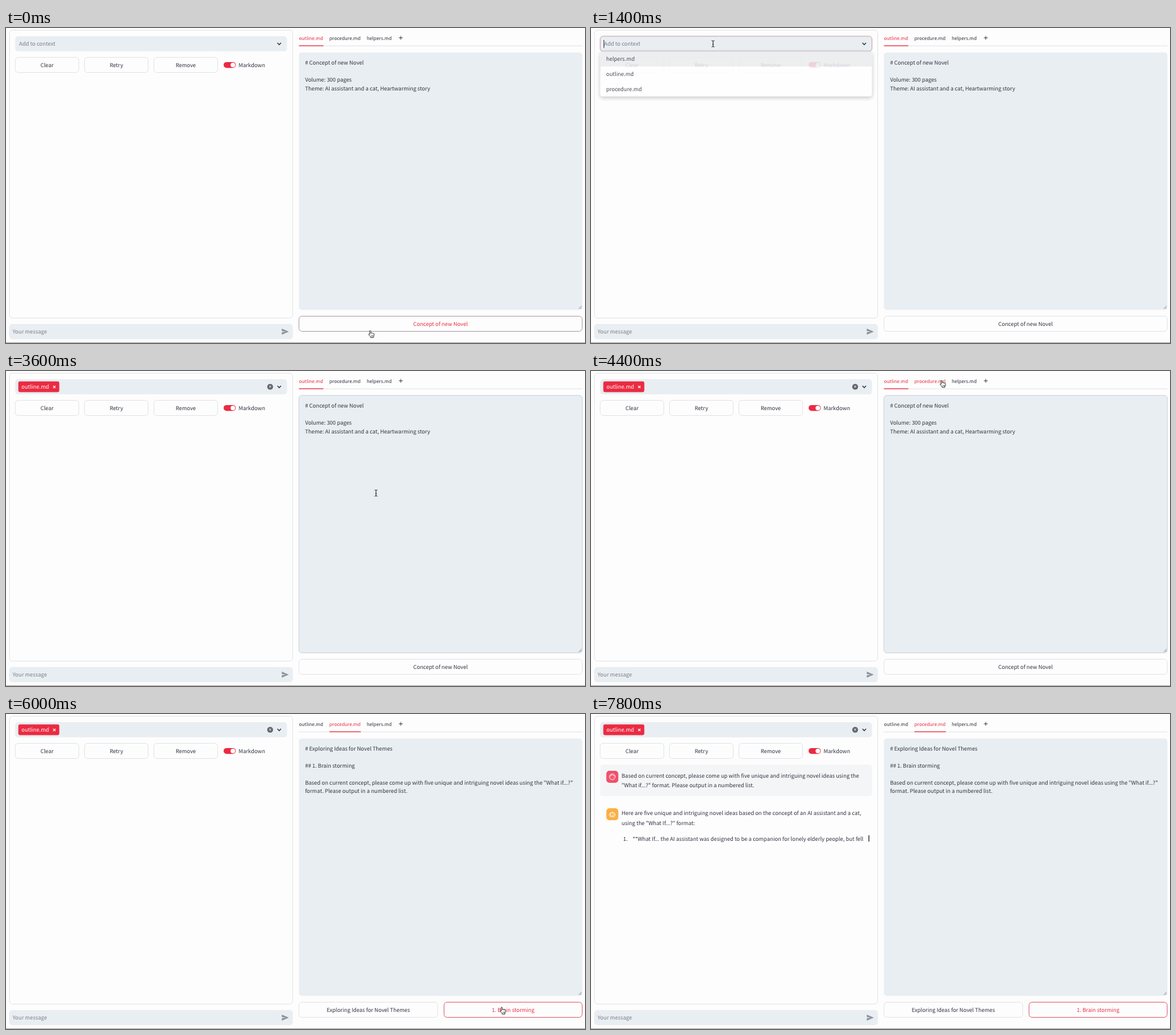
An HTML page that plays this animation: 918 by 499 pixels, repeating every 8000 ms.

```html
<!DOCTYPE html>
<html lang="en">
<head>
<meta charset="utf-8">
<title>Novel assistant</title>
<style>
  html, body { margin: 0; width: 100%; height: 100%; overflow: hidden; background: #fdfdfd; }
  svg { display: block; width: 918px; height: 499px; }
  text {
    font: 8.54px "Noto Sans CJK JP", "Noto Sans CJK SC", "Noto Sans CJK", "Noto Sans", sans-serif;
    text-rendering: geometricPrecision;
    white-space: pre;
  }
  .tab { font-size: 7.47px; }
</style>
</head>
<body>
<svg viewBox="0 0 918 499"></svg>
<script>
const LOOP = 8000, STEP = 200;
const RED = '#ea2b42', INK = '#31333f', FIELD = '#e9eef2', LINE = '#e3e4e7', GRAY = '#7b7e87';
const svg = document.querySelector('svg');

const PROMPT = ['Based on current concept, please come up with five unique and intriguing novel ideas using the',
  '"What if...?" format. Please output in a numbered list.'];
const NOTES = {
  outline: ['# Concept of new Novel', '', 'Volume: 300 pages',
    'Theme: AI assistant and a cat, Heartwarming story'],
  procedure: ['# Exploring Ideas for Novel Themes', '', '## 1. Brain storming', '',
    PROMPT[0] + ' "What if...?"', 'format. Please output in a numbered list.']
};
const REPLY = [
  { x: 48.5, y: 160.3, s: 'Here are five unique and intriguing novel ideas based on the concept of an AI assistant and a cat,' },
  { x: 48.5, y: 175.5, s: 'using the "What If...?" format:' },
  { x: 66, y: 200.7, s: '**What If... the AI assistant was designed to be a companion for lonely elderly people, but fell' }
];
const REPLY_LENGTH = REPLY.reduce((n, line) => n + line.s.length, 0);
const PAUSE_LENGTH = REPLY[0].s.length + 'using the "'.length;

// Pointer path: time, x, y, shape from that time on
const POINTER = [
  [0, 579.5, 485, 'hand'], [200, 579.5, 485, 'hand'], [400, 540, 440, 'beam'], [600, 450, 340, 'arrow'],
  [800, 300, 170, 'arrow'], [1000, 205, 58, 'hand'], [1200, 193.5, 25, 'beam'], [1600, 193.5, 25, 'hand'],
  [2000, 107, 84, 'hand'], [2800, 107, 84.5, 'hand'], [3000, 300, 150, 'arrow'], [3200, 560, 200, 'beam'],
  [3800, 600, 190, 'beam'], [4200, 560, 32, 'arrow'], [4400, 558, 20.5, 'hand'], [4800, 558, 20.5, 'hand'],
  [5000, 600, 90, 'beam'], [5400, 765, 410, 'beam'], [5600, 788, 470, 'hand'], [6400, 788, 470, 'hand'],
  [6600, 800, 484, 'arrow'], [6800, 0, 0, 'none']
];
const SHAPES = {
  hand: `<path d="M-3-4.7c0-1.3 1.8-1.3 1.9 0L-.8-1.5c.4-.8 1.5-.6 1.6.1.5-.6 1.5-.4 1.6.3.7-.5 1.8-.1 1.7.9C4.1 2.3 3.7 3.4 3 4.2V5.4H-1.4V4.3C-2.6 3.2-3.4 1.9-4.3.8-5-.2-3.7-.8-2.6.4Z"
    fill="#fff" stroke="#222" stroke-width=".9" stroke-linejoin="round"/>
    <path d="M-.2 1.7V4M1.2 1.7V4M2.5 1.7V4" stroke="#222" stroke-width=".6"/>`,
  beam: `<path d="M-2.2-5Q0-5 0-3.8Q0-5 2.2-5M0-4V4M-2.2 5Q0 5 0 3.8Q0 5 2.2 5M-1 .8H1"
    fill="none" stroke="#222" stroke-width="1"/>`,
  arrow: `<path d="M-3-5V4.5L-.8 2.5.7 5.6 2.2 4.9.8 1.9H3.7Z" fill="#222" stroke="#fff" stroke-width=".8"/>`
};

const lerp = (a, b, k) => a + (b - a) * k;
const clamp = v => Math.max(0, Math.min(1, v));
const text = (x, y, s, fill = INK, extra = '') => `<text x="${x}" y="${y}" fill="${fill}" ${extra}>${s}</text>`;
const box = (x, y, x2, y2, fill, stroke = 'none', r = 4.8) =>
  `<rect x="${x}" y="${y}" width="${x2 - x}" height="${y2 - y}" rx="${r}" fill="${fill}" stroke="${stroke}"/>`;
const stroke = (d, color, width = 1) => `<path d="${d}" fill="none" stroke="${color}" stroke-width="${width}"/>`;
const cross = (x, y, r, color) => stroke(`M${x - r} ${y - r}L${x + r} ${y + r}M${x + r} ${y - r}L${x - r} ${y + r}`, color, 1.1);
const button = (x, y, x2, label, hot = false, edge = '#df6070') =>
  box(x, y, x2, y + 24, '#fdfdfd', hot ? edge : LINE) +
  text((x + x2) / 2, y + 15.1, label, hot ? RED : INK, 'text-anchor="middle"');

function selectBox(t) {
  const open = t >= 1400 && t < 3400, chosen = t >= 2400;
  let out = box(14.5, 13, 445.5, 37, FIELD, open ? (chosen ? '#a9b3bd' : '#c9a0aa') : 'none');
  if (chosen) {
    out += box(19.5, 16.5, 84.5, 33.5, RED, 'none', 2.4) + text(24.5, 28.3, 'outline.md', '#fff') +
      cross(76.6, 25.2, 1.9, '#fff') + '<circle cx="418.8" cy="25" r="4.6" fill="#5d6068"/>' +
      cross(418.8, 25, 1.6, FIELD);
  } else {
    out += text(20.8, 28.3, 'Add to context', GRAY);
    if (open) out += stroke('M20.5 19V31.5', INK);
  }
  return out + stroke('M430.4 23.6L433.2 26.4L436 23.6', INK, 1.4);
}

function controls(t) {
  return button(14.5, 46.5, 115.5, 'Clear') + button(124.5, 46.5, 225.5, 'Retry', t === 1000) +
    button(234.5, 46.5, 335.5, 'Remove') + box(345, 54, 364.3, 63.2, RED, 'none', 4.6) +
    '<circle cx="359.7" cy="58.6" r="3.7" fill="#fff"/>' + text(368.8, 61.8, 'Markdown');
}

function dropdown(t) {
  if (t < 1400 || t >= 3400) return '';
  const items = t < 2400 ? ['helpers.md', 'outline.md', 'procedure.md'] : ['helpers.md', 'procedure.md'];
  const active = t < 1800 ? 0 : t < 3000 ? 1 : -1;
  const bottom = 37 + items.length * 24 - .5;
  const rows = items.map((name, i) =>
    (i === active ? box(14.5, 37 + i * 24, 445.5, 61 + i * 24 - (i === items.length - 1 ? .5 : 0), '#ebecef', 'none', 2) : '') +
    text(24, 52 + i * 24, name)).join('');
  return `<g opacity="${t === 1400 ? .87 : 1}"><g style="filter:drop-shadow(0 2px 3px #0004)">` +
    box(14.5, 37, 445.5, bottom, '#fff', 'none', 4) + `</g>${rows}</g>`;
}

function avatar(y, color, icon) {
  return box(24.3, y, 43.3, y + 19, color) +
    `<g transform="translate(33.8 ${y + 9.5})" fill="none" stroke="#fff" stroke-width=".9">${icon}</g>`;
}

function chat(t) {
  let out = '';
  if (t >= 6400) {
    out += box(14.5, 80, 445.5, 130, '#f4f5f7') +
      avatar(90, '#f0506a', '<circle r="4.6"/><path d="M-4.4-1Q-1.5-1-.6-3.8Q1-1.2 4.4-1.3M-1.8 1.2V2M1.8 1.2V2"/>') +
      PROMPT.map((s, i) => text(48.5, 100.8 + i * 15.2, s)).join('');
  }
  if (t < 6600) return out;
  out += avatar(149.3, '#fbb046', '<path d="M-3.2-2.2H3.2V4H-3.2ZM0-2.2V-4.3M-4.8-.2V2M4.8-.2V2M-1.5-.2V.8M1.5-.2V.8M-1.5 2.4H1.5"/>');
  let left = Math.round(t < 7000 ? PAUSE_LENGTH * (t - 6400) / 600
    : lerp(PAUSE_LENGTH, REPLY_LENGTH, clamp((t - 7000) / 800)));
  for (const [i, line] of REPLY.entries()) {
    if (left <= 0) break;
    if (i === 2) out += text(51, line.y, '1.');
    out += text(line.x, line.y, line.s.slice(0, left), INK, 'class="reply"');
    left -= line.s.length;
  }
  return out + '<rect class="caret" width="1.4" height="10" fill="#31333f"/>';
}

function editor(t) {
  const procedure = t >= 4600, slide = clamp((t - 4400) / 400);
  const tab = (x, name, on) => text(x, 18.9, name, on ? RED : INK, 'class="tab"');
  const lines = t >= 4800 ? NOTES.procedure : NOTES.outline;
  const focused = t >= 3400 && t < 4600;
  let out = tab(464.4, 'outline.md', !procedure) + tab(512.7, 'procedure.md', t >= 4400) + tab(572, 'helpers.md') +
    stroke('M622.9 15.6H628.9M625.9 12.6V18.6', INK, .9) + stroke('M464.5 28.3H914', LINE) +
    stroke(`M${lerp(464.4, 512.7, slide)} 28.2H${lerp(503.2, 562.6, slide)}`, RED, 1.2) +
    box(464.3, 38.7, 913.8, 446.5, FIELD, focused ? '#cbd2d8' : 'none') +
    stroke('M908 445L912.7 440.3M910.7 445L912.7 443', '#777', .8) +
    lines.map((s, i) => text(474.2, 58.3 + i * 13.4, s)).join('');
  if (t < 4800) out += button(464.5, 456.5, 913.5, 'Concept of new Novel', t < 400, '#aaa0a4');
  else if (t < 5000) out += button(464.5, 456.5, 913.5, 'Exploring Ideas for Novel Themes');
  else out += button(464.5, 456.5, 684.5, 'Exploring Ideas for Novel Themes') +
    button(694.5, 456.5, 913.5, '1. Brain storming', t >= 5600);
  return out;
}

function pointer(t) {
  const i = POINTER.findLastIndex(key => key[0] <= t);
  const [t0, x0, y0, shape] = POINTER[i];
  if (shape === 'none') return '';
  const [t1, x1, y1] = POINTER[i + 1], k = (t - t0) / (t1 - t0);
  return `<g transform="translate(${lerp(x0, x1, k)} ${lerp(y0, y1, k)})">${SHAPES[shape]}</g>`;
}

function render(t) {
  svg.innerHTML = box(5.5, 3.5, 454.5, 459.5, '#fdfdfd', LINE) + controls(t) + selectBox(t) + chat(t) + dropdown(t) +
    box(5, 469, 454.8, 493, FIELD) + text(10.4, 484, 'Your message', GRAY) +
    '<path d="M437.3 476.3L448.3 481L437.3 485.7V482L444 481L437.3 480Z" fill="#8b8f98"/>' +
    editor(t) + stroke('M0 498.5H918', '#a5a5a7') + pointer(t);
  const line = [...svg.querySelectorAll('.reply')].pop();
  if (!line) return;
  const caret = svg.querySelector('.caret');
  caret.setAttribute('x', +line.getAttribute('x') + line.getComputedTextLength() + 8);
  caret.setAttribute('y', line.getAttribute('y') - 8.6);
}

let shown = -1;
function frame() {
  const t = Math.floor(performance.now() % LOOP / STEP) * STEP;
  if (t !== shown) render(shown = t);
  requestAnimationFrame(frame);
}
frame();
</script>
</body>
</html>
```
